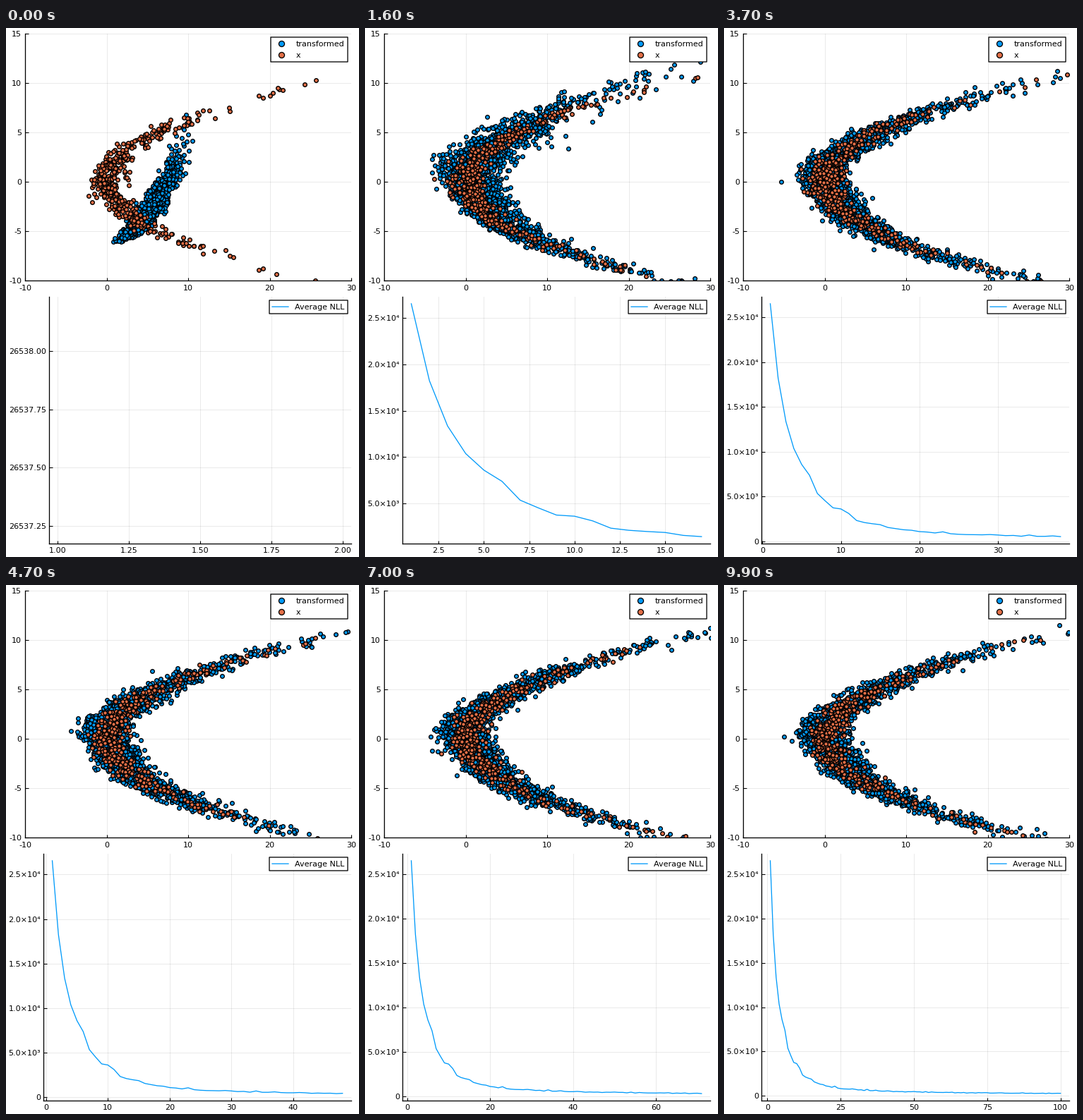
Recreate the animation shown at these times as a matplotlib script. Size 500x750 px, loop 10000 ms.

```python
import numpy as np
import matplotlib.pyplot as plt
from matplotlib.animation import FuncAnimation
from matplotlib.patches import Rectangle

W, H, DPI = 500, 750, 100
FRAMES, INTERVAL = 100, 100
PT = 72 / DPI  # points per pixel
BLUE, ORANGE = "#009afa", "#e36f47"
N_BLUE, N_ORANGE = 2500, 450

plt.rcParams.update({"font.family": "DejaVu Sans", "font.size": 8})


def loss_curve():
    head = [26537.204, 18240, 13360, 10380, 8600, 7390, 5360, 4530, 3755,
            3630, 3125, 2340, 2110, 1980, 1875, 1560, 1430, 1305, 1250, 1100,
            1050, 950, 1075, 860, 800, 765, 755, 740, 770, 720, 650, 670,
            580, 720, 570, 570, 620, 540]
    n = np.arange(len(head) + 1, FRAMES + 1)
    noise = np.random.default_rng(4).normal(0, 22, n.size)
    return np.append(head, 540 * (38 / n) ** 0.78 + noise)


LOSS = loss_curve()


def gamma_from(z, k):
    """Gamma variate from a normal one (Wilson-Hilferty)."""
    return k * np.maximum(1 - 1 / (9 * k) + z / (3 * np.sqrt(k)), 0) ** 3


def banana(a, b):
    y = 4 * a
    return np.array([y ** 2 / 4 + b, y])


def learned_shape(a, b, c):
    """The banana with looser edges and a slight twist at its bend."""
    x, y = banana(a, 1.3 * b)
    twist = 0.8 * np.sin(y / 1.3) * np.exp(-y ** 2 / 18)
    return np.array([x - twist, y + 0.25 * c])


def start_shape(a, b):
    t = gamma_from(a, 3)
    return np.array([2.5 + 0.95 * t - 0.03 * t ** 2 + 0.8 * b,
                     t - 6.0 + 0.25 * b])


def cloud_shape(a, b, tail):
    x = 4.5 + 3.7 * b + tail
    floor = np.where(x < 3, -2.4 - 0.62 * (x + 4), -6.74 - 0.06 * (x - 3))
    scale = np.interp(x, [-6, 6, 10, 14], [2.6, 3, 2.7, 1.5])
    return np.array([x, floor + scale * gamma_from(a, 2.3)])


def samples(i):
    rng = np.random.default_rng(100 + i)
    a, b, c = rng.normal(size=(3, N_BLUE))
    tail = rng.exponential(4.5, N_BLUE) * (rng.random(N_BLUE) < 0.13)
    cloud = cloud_shape(a, b, tail)
    if i <= 8:
        w = (i / 8) ** 0.8
        moved = (1 - w) * start_shape(a, b) + w * cloud
    else:
        w = 1 - np.exp(-(i - 8) / 4)
        moved = (1 - w) * cloud + w * learned_shape(a, b, c)
    return moved, banana(*rng.normal(size=(2, N_ORANGE)))


def nice_ticks(lo, hi):
    e = np.floor(np.log10(hi - lo))
    options = []
    for p in (e - 1, e):
        for q in (1, 5, 2.5, 2):
            s = q * 10 ** p
            options.append(np.arange(np.ceil(lo / s), np.floor(hi / s) + 1) * s)
    return min(options, key=lambda t: abs(len(t) - 5))


def decimals(values, least=0):
    d = least
    while not np.allclose(values, np.round(values, d), rtol=0, atol=1e-7):
        d += 1
    return d


def plain(ticks):
    d = decimals(ticks)
    return [f"{abs(t) if t == 0 else t:.{d}f}" for t in ticks]


def scientific(ticks):
    exps = [int(np.floor(np.log10(t) + 1e-9)) if t > 0 else 0 for t in ticks]
    mants = [t / 10 ** e for t, e in zip(ticks, exps)]
    d = decimals(mants, 1)
    return [f"{m:.{d}f}×10{'⁰¹²³⁴⁵'[e]}" if m > 0 else "0"
            for m, e in zip(mants, exps)]


def place(ax, left, top, right=489, height=350):
    ax.set_position([left / W, 1 - (top + height) / H,
                     (right - left) / W, height / H])


def make_axes(left, top, ypad):
    ax = fig.add_axes([0, 0, 1, 1])
    place(ax, left, top)
    ax.patch.set_visible(False)
    ax.set_axisbelow(True)
    ax.grid(color="black", alpha=0.1, lw=0.8 * PT)
    for side in ("top", "right"):
        ax.spines[side].set_visible(False)
    for side in ("left", "bottom"):
        ax.spines[side].set_linewidth(1.3 * PT)
    ax.tick_params(direction="in", length=4.5 * PT, width=1.1 * PT)
    ax.tick_params(axis="x", pad=5.5 * PT)
    ax.tick_params(axis="y", pad=ypad * PT)
    return ax


def dots(ax, x, y, color, size, edge, **kw):
    return ax.plot(x, y, "o", ms=size * PT, mfc=color, mec="black",
                   mew=edge * PT, **kw)[0]


def legend_box(x, y, w, h):
    overlay.add_patch(Rectangle((x, y), w, h, fc="white", ec="black",
                                lw=1.3 * PT, joinstyle="round", snap=False))


fig = plt.figure(figsize=(W / DPI, H / DPI), dpi=DPI, facecolor="white")

top_ax = make_axes(27, 8, 5)
top_ax.set(xlim=(-10, 30), ylim=(-10, 15))
xt, yt = np.arange(-10, 31, 10), np.arange(-10, 16, 5)
top_ax.set_xticks(xt, plain(xt))
top_ax.set_yticks(yt, plain(yt))
blue = dots(top_ax, [], [], BLUE, 5.6, 1.4)
orange = dots(top_ax, [], [], ORANGE, 5.6, 1.4)

low_ax = make_axes(53.2, 381, 4.2)
curve, = low_ax.plot([], [], color=BLUE, lw=1.3 * PT)

overlay = fig.add_axes([0, 0, 1, 1], zorder=5)
overlay.set(xlim=(0, W), ylim=(H, 0))
overlay.axis("off")
legend_box(375, 13, 109, 35)
for name, color, y in (("transformed", BLUE, 22.2), ("x", ORANGE, 37.6)):
    dots(overlay, [390], [y], color, 8, 1.3)
    overlay.text(411, y + 4, name)
legend_box(373, 386, 111, 19)
overlay.plot([377, 400], [395.2, 395.2], color=BLUE, lw=1.3 * PT, snap=False)
overlay.text(409, 399.2, "Average NLL")


def widened(lo, hi):
    pad = 0.03 * (hi - lo)
    return lo - pad, hi + pad


def update(i):
    moved, target = samples(i)
    blue.set_data(*moved)
    orange.set_data(*target)

    n = i + 1
    loss = LOSS[:n]
    curve.set_data(np.arange(1, n + 1), loss)
    xlim = widened(1, max(n, 2))
    ylim = widened(loss.min(), loss.max() if n > 1 else loss[0] + 1)
    xticks, yticks = nice_ticks(*xlim), nice_ticks(*ylim)
    labels = scientific(yticks) if n > 1 else plain(yticks)
    low_ax.set_xticks(xticks, plain(xticks))
    low_ax.set_yticks(yticks, labels)
    low_ax.set(xlim=xlim, ylim=ylim)
    place(low_ax, 53.2 + 8 * (max(map(len, labels)) - 7), 381)
    return blue, orange, curve


anim = FuncAnimation(fig, update, frames=FRAMES, interval=INTERVAL,
                     init_func=lambda: (blue, orange, curve),
                     repeat=True, repeat_delay=0, blit=False)
plt.show()
```
